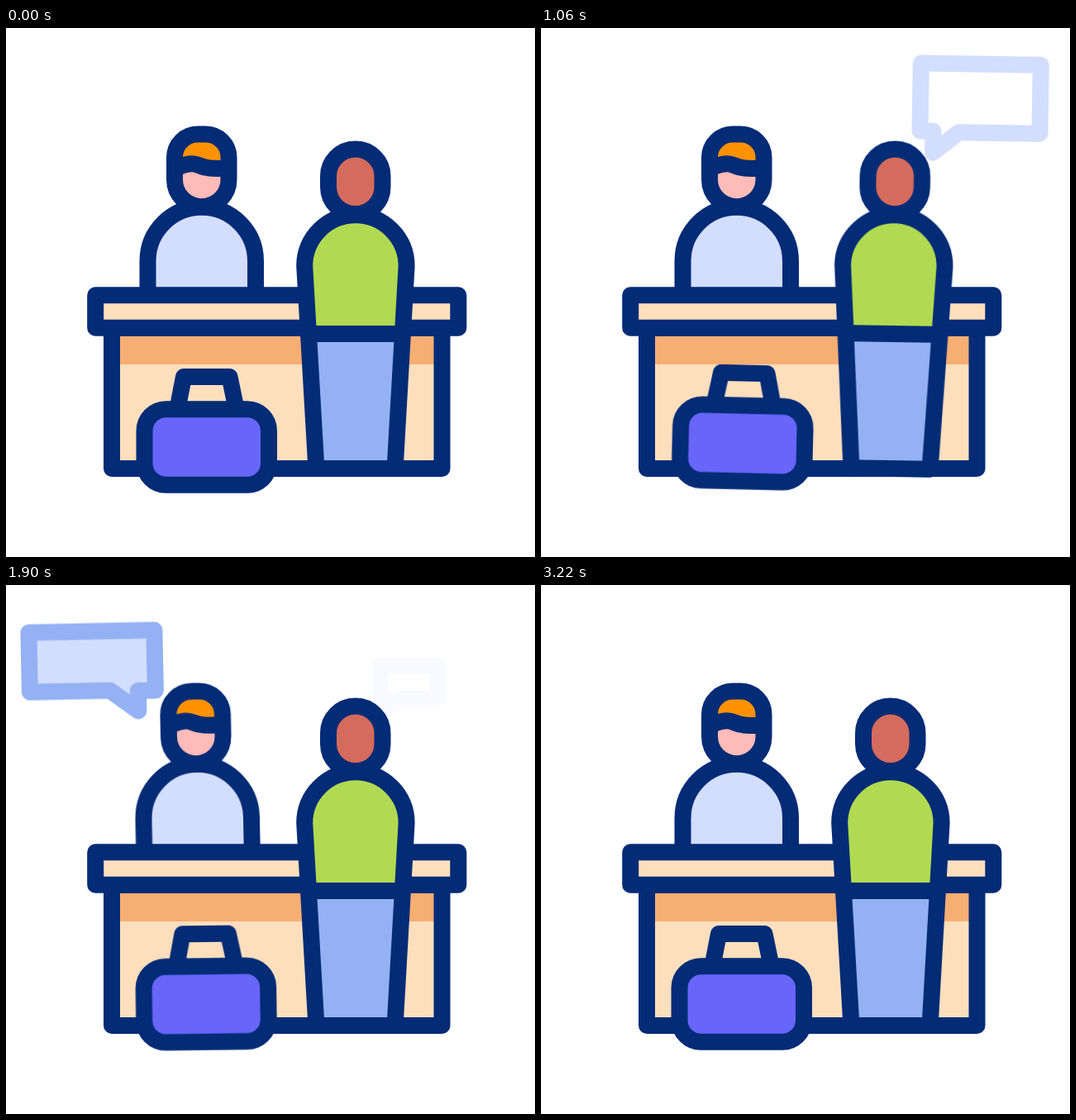
Recreate the animation shown at these times as an HTML page. Size 640x640 px, loop 3.42 s.

```html
<!DOCTYPE html>
<html lang="en">
<head>
<meta charset="utf-8">
<title>Reception desk</title>
<style>
  html, body { margin: 0; width: 100%; height: 100%; overflow: hidden; background: #fff; }
  svg { display: block; width: 100%; height: 100%; }

  .ink { stroke: #032b76; }
  .ink, .bubble { stroke-width: 20; stroke-linejoin: round; }
  .none { fill: none; }
  .pale { fill: #d3ddfd; }
  .sky { fill: #93b1f3; }
  .sand { fill: #fddfbd; }

  .move {
    animation: 3420ms cubic-bezier(.364, 0, .636, 1) infinite both;
  }
  .bubble { vector-effect: non-scaling-stroke; }

  #customer { transform-origin: 423px 533px; animation-name: customer; }
  #ask { transform-origin: 452px 150px; animation-name: ask; fill: #fff; stroke: #d3ddfd; }
  #clerk { transform-origin: 236.5px 533px; animation-name: clerk; }
  #answer { transform-origin: 189px 151px; animation-name: answer; fill: #d3ddfd; stroke: #93b1f3; }
  #bag { transform-origin: 242.7px 553px; animation-name: bag; }

  @keyframes customer {
    0% { transform: rotate(0deg); }
    11.7% { transform: rotate(2deg); }
    23.98% { transform: rotate(-2deg); }
    32.16% { transform: rotate(1.05deg); }
    37.72%, 100% { transform: rotate(0deg); }
  }
  @keyframes ask {
    0% { transform: scale(.4); opacity: 0; }
    11.7% { transform: scale(1.055); opacity: 1; }
    20.47%, 46.78% { transform: scale(1); opacity: 1; }
    58.48%, 100% { transform: scale(.4); opacity: 0; }
  }
  @keyframes clerk {
    0%, 34.65% { transform: rotate(0deg); }
    46.78% { transform: rotate(2.6deg); }
    59.06% { transform: rotate(-2deg); }
    67.69% { transform: rotate(.95deg); }
    74.27%, 100% { transform: rotate(0deg); }
  }
  @keyframes answer {
    0%, 34.65% { transform: scale(.4); opacity: 0; }
    46.78% { transform: scale(1.17); opacity: 1; }
    54.97%, 82.46% { transform: scale(1); opacity: 1; }
    94.15%, 100% { transform: scale(.4); opacity: 0; }
  }
  @keyframes bag {
    0%, 29.24% { transform: translateY(0px) rotate(0deg); }
    38.01% { transform: translateY(-46px) rotate(13.5deg); }
    46.78% { transform: translateY(0px) rotate(-5deg); }
    58.48%, 100% { transform: translateY(0px) rotate(0deg); }
  }
</style>
</head>
<body>
<svg viewBox="0 0 640 640">
  <g id="clerk" class="move">
    <path id="answer" class="bubble move" d="M37 53.5H189V126.5H168V151L134 125.5H37Z"/>
    <path class="ink pale" d="M171.5 345V282a65.25 65.25 0 0 1 130.5 0V345"/>
    <path fill="#ffbbb7" d="M204 156h65.5v27.5a32.75 32.75 0 0 1-65.5 0z"/>
    <path fill="#ff9200" d="M204 169v-12.5a28 28 0 0 1 28-28h9.5a28 28 0 0 1 28 28V169z"/>
    <path class="ink none" d="M204 170C214 166 224 162 233 166S247 170 269.5 170"/>
    <path class="ink none" d="M232 128.5h9.5a28 28 0 0 1 28 28v27a32.75 32.75 0 0 1-65.5 0v-27a28 28 0 0 1 28-28z"/>
  </g>

  <g id="desk">
    <path class="sand" d="M128 363H527.5V533H128z"/>
    <path fill="#f7ae72" d="M128 363H527.5V407H128z"/>
    <path class="ink none" d="M128 363H527.5V533H128z"/>
    <path class="ink sand" d="M108.2 323.2H547.3V362.7H108.2z"/>
  </g>

  <g id="bag" class="move">
    <path class="ink none" d="M208 458L215 422H270.5L278 458"/>
    <rect class="ink" fill="#6865f9" x="167.5" y="461.3" width="150.5" height="91.4" rx="26"/>
  </g>

  <g id="customer" class="move">
    <path id="ask" class="bubble move" d="M452 42H597V125H499L468 150V124H452Z"/>
    <path class="ink" fill="#d56b5c" d="M390 179.3a32.75 32.75 0 0 1 65.5 0v13a32.75 32.75 0 0 1-65.5 0z"/>
    <path fill="#b1da52" d="M366 370L361.2 288A61.7 61.7 0 0 1 484.6 288L480 370z"/>
    <path class="sky" d="M366 370H480L470.6 533H375.4z"/>
    <path class="ink none" d="M375.4 533L361.2 288A61.7 61.7 0 0 1 484.6 288L470.6 533zM366 370H480"/>
  </g>
</svg>
</body>
</html>
```
